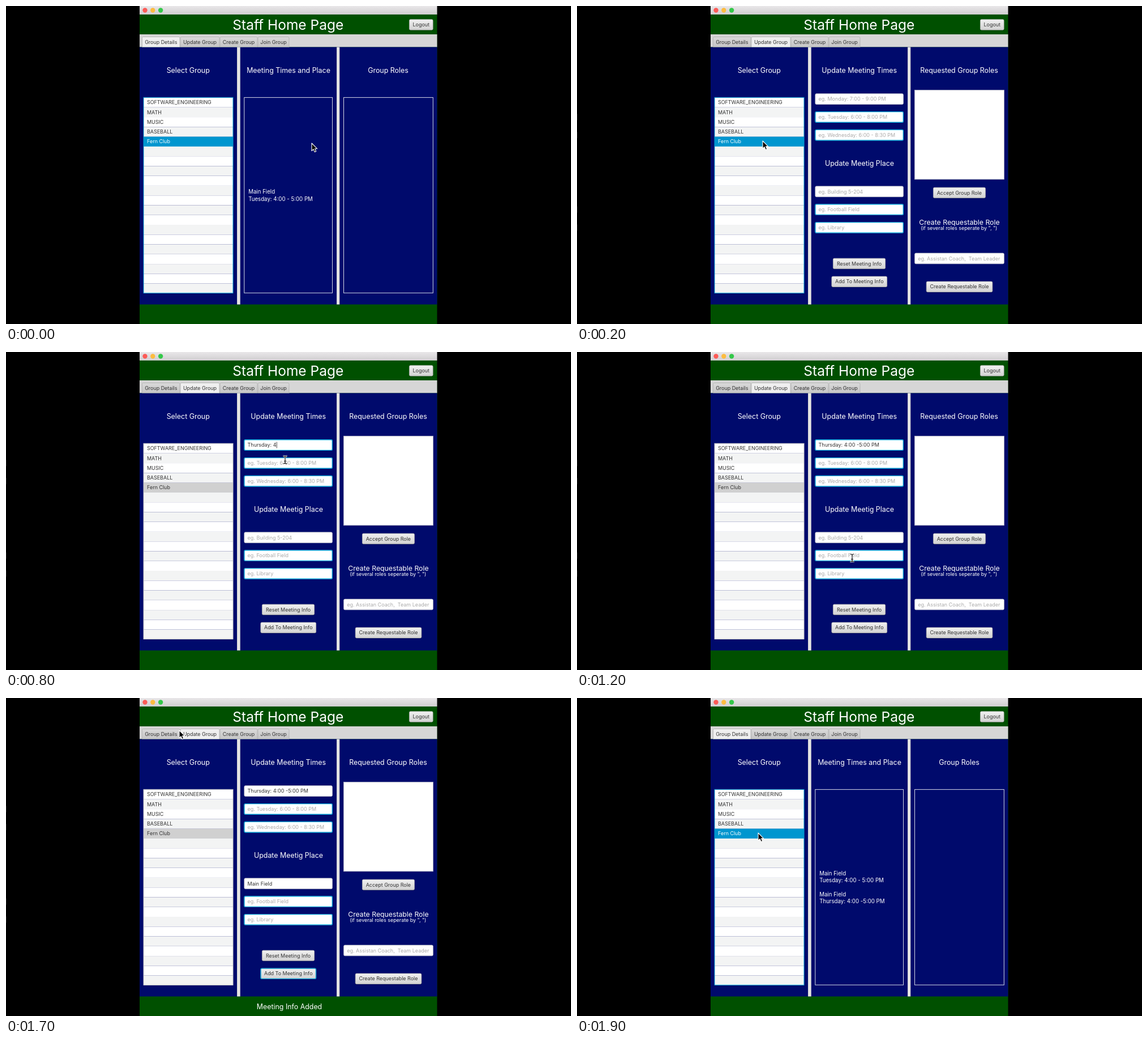
Write an HTML page that moves like this. It is 998 by 561 pixels and loops after 2000 ms.

```html
<!DOCTYPE html>
<html lang="en">
<head>
<meta charset="utf-8">
<title>Staff Home Page</title>
<style>
html, body { margin: 0; width: 100%; height: 100%; overflow: hidden; background: #000; }
svg { display: block; width: 998px; height: 561px; }
text { font-family: Inter, "Open Sans", sans-serif; font-optical-sizing: none; white-space: pre; }
</style>
</head>
<body>
<svg id="stage" viewBox="0 0 998 561">
  <defs>
    <linearGradient id="bar" x2="0" y2="1"><stop stop-color="#e9e7e9"/><stop offset="1" stop-color="#d0ced0"/></linearGradient>
    <linearGradient id="btn" x2="0" y2="1"><stop stop-color="#f1f1f1"/><stop offset="1" stop-color="#d2d2d2"/></linearGradient>
    <linearGradient id="tab" x2="0" y2="1"><stop stop-color="#d9d9d9"/><stop offset="1" stop-color="#c6c6c6"/></linearGradient>
    <linearGradient id="split"><stop stop-color="#d2d2d2"/><stop offset=".5" stop-color="#ececec"/><stop offset="1" stop-color="#d2d2d2"/></linearGradient>
  </defs>
</svg>
<script>
const NS = 'http://www.w3.org/2000/svg';
const stage = document.getElementById('stage');
const WHITE = '#fff', INK = '#333', HINT = '#ababab', FOCUS = '#039ed3', GREEN = '#005000', NAVY = '#000a6c';

function add(parent, tag, attrs, content) {
  const el = document.createElementNS(NS, tag);
  for (const key in attrs) el.setAttribute(key, attrs[key]);
  if (content !== undefined) el.textContent = content;
  parent.appendChild(el);
  return el;
}
const group = (parent = stage) => add(parent, 'g', {});
const show = (el, on) => el.setAttribute('visibility', on ? 'inherit' : 'hidden');
const rect = (p, x, y, width, height, fill, more) => add(p, 'rect', { x, y, width, height, fill, ...more });
const label = (p, x, y, size, fill, str, anchor = 'start') =>
  add(p, 'text', { x, y, 'font-size': size, fill, 'text-anchor': anchor }, str);
const heading = (p, x, y, str) => label(p, x, y, 12.4, WHITE, str, 'middle');
const ring = (p, x, y, w, h) => rect(p, x, y, w, h, 'none', { rx: 2, stroke: FOCUS, 'stroke-width': 1.4 });

function button(p, x, y, w, str) {
  rect(p, x, y + .8, w, 19, '#000', { rx: 2, opacity: .3 });
  rect(p, x + .4, y + .4, w - .8, 18.4, 'url(#btn)', { rx: 2, stroke: '#b4b4b4', 'stroke-width': .8 });
  label(p, x + w / 2, y + 12.7, 8.95, INK, str, 'middle');
}

function field(p, x, cy, w, hint) {
  rect(p, x + .4, cy - 9.4, w - .8, 18.8, WHITE, { rx: 2, stroke: '#c4c4cc', 'stroke-width': .8 });
  const focus = ring(p, x + .5, cy - 9.3, w - 1, 18.6);
  const text = label(p, x + 6, cy + 3.2, 9, HINT, hint);
  const caret = rect(p, 0, cy - 5.5, .8, 11, '#222');
  return (value, focused, blink) => {
    text.textContent = value || (focused ? '' : hint);
    text.setAttribute('fill', value ? INK : HINT);
    show(focus, focused);
    show(caret, focused && blink);
    const width = value ? text.getComputedTextLength() : 0;
    caret.setAttribute('x', x + 6.3 + width);
  };
}

// Window frame
rect(stage, 236, 0, 525.5, 15, 'url(#bar)');
['#fc5b57', '#fdbc40', '#34c84a'].forEach((fill, i) =>
  add(stage, 'circle', { cx: 245.5 + i * 13.8, cy: 7.5, r: 4.2, fill }));
rect(stage, 236, 15, 525.5, 546, GREEN);
label(stage, 498.3, 41.6, 24.5, WHITE, 'Staff Home Page', 'middle');
button(stage, 712, 23.4, 42.5, 'Logout');
rect(stage, 236, 50, 525.5, 22.5, '#d6d6d6');
rect(stage, 236, 72.5, 525.5, 454, NAVY);

const tabs = [['Group Details', 240.5, 66.5], ['Update Group', 308, 69], ['Create Group', 378, 66], ['Join Group', 445, 55]]
  .map(([name, x, w]) => {
    const d = `M${x} 72.5V56.5q0-2 2-2h${w - 4}q2 0 2 2v16`;
    const shape = add(stage, 'path', { d, stroke: '#b0b0b0', 'stroke-width': .8 });
    const focus = ring(stage, x + .7, 55, w - 1.4, 17);
    label(stage, x + w / 2, 67, 8.95, INK, name, 'middle');
    return { shape, focus };
  });

[[408, 5.8], [584, 5.3]].forEach(([x, w]) => rect(stage, x, 72.5, w, 454, 'url(#split)'));

// Group list
heading(stage, 321.7, 118.3, 'Select Group');
const ROW = 17.27, TOP = 161.5;
for (let i = 0; i < 20; i++)
  rect(stage, 243, TOP + i * ROW, 158, ROW, i % 2 ? '#f3f4f4' : WHITE);
const picked = rect(stage, 243, TOP + 4 * ROW, 158, ROW, FOCUS);
const rows = ['SOFTWARE_ENGINEERING', 'MATH', 'MUSIC', 'BASEBALL', 'Fern Club']
  .map((name, i) => label(stage, 249, 173.4 + i * ROW, 8.95, INK, name));
const listEdge = rect(stage, 243, 161.3, 158, 345, 'none', { 'stroke-width': 1 });

// Group Details pane
const details = group();
heading(details, 499, 118.3, 'Meeting Times and Place');
heading(details, 675, 118.3, 'Group Roles');
[[420.8, 155.7], [596.5, 157.8]].forEach(([x, w]) =>
  rect(details, x, 161.4, w, 344.8, 'none', { stroke: '#d8d9e6', 'stroke-width': 1 }));
function notes(lines, y) {
  const g = group(details);
  lines.forEach((line, i) => label(g, 428.2, y + i * 12.4, 9.68, WHITE, line));
  return g;
}
const tuesday = ['Main Field', 'Tuesday: 4:00 - 5:00 PM'];
const before = notes(tuesday, 331.2);
const after = notes([...tuesday, '', 'Main Field', 'Thursday: 4:00 -5:00 PM'], 312.6);

// Update Group pane
const update = group();
heading(update, 498.7, 118.3, 'Update Meeting Times');
heading(update, 499, 282.2, 'Update Meetig Place');
heading(update, 675, 118.3, 'Requested Group Roles');
const [setTime] = ['Monday: 7:00 - 9:00 PM', 'Tuesday: 6:00 - 8:00 PM', 'Wednesday: 6:00 - 8:30 PM']
  .map((hint, i) => field(update, 420.5, 164.1 + i * 31.8, 156.3, 'eg. ' + hint));
const [setPlace] = ['Building 5-204', 'Football Field', 'Library']
  .map((hint, i) => field(update, 420.5, 327.3 + i * 31.8, 156.3, 'eg. ' + hint));
field(update, 596.2, 445.4, 158.5, 'eg. Assistan Coach,  Team Leader')('', false);
rect(update, 596.5, 148.3, 157.8, 157.5, WHITE, { stroke: '#c4c4cc', 'stroke-width': .8 });
button(update, 629, 319.8, 92.8, 'Accept Group Role');
button(update, 452, 444.8, 93, 'Reset Meeting Info');
button(update, 449.5, 476.7, 98.5, 'Add To Meeting Info');
const addFocus = ring(update, 450, 477.1, 97.5, 18.3);
button(update, 616.8, 485.7, 117.4, 'Create Requestable Role');
label(update, 675.4, 385.7, 12.25, WHITE, 'Create Requestable Role', 'middle');
label(update, 674.8, 394.6, 8.92, WHITE, '(if several roles seperate by ", ")', 'middle');

const notice = heading(stage, 500.5, 548.7, 'Meeting Info Added');

// Pointers
const arrow = add(stage, 'path', {
  d: 'M0 0V13.6L3.1 10.7 5.2 15.6 7.7 14.5 5.6 9.8H9.7Z',
  fill: '#000', stroke: WHITE, 'stroke-width': 1.1, 'stroke-linejoin': 'round'
});
const beam = group();
[[WHITE, 2.6], ['#111', 1.2]].forEach(([stroke, width]) => add(beam, 'path', {
  d: 'M-3.5-6.5Q0-6.5 0-4.5Q0-6.5 3.5-6.5M0-4.5V5M-2 2.5H2M-3.5 7Q0 7 0 5Q0 7 3.5 7',
  fill: 'none', stroke, 'stroke-width': width
}));

// Each step holds 100 ms: pointer, x, y, focus, typed time, typed place
const STEP = 100;
const FULL = 'Thursday: 4:00 -5:00 PM';
const PLACE = 'Main Field';
const steps = [
  ['arrow', 540, 242, 'list', 0, 0],
  ['arrow', 460, 136, 'tab', 0, 0],
  ['arrow', 328, 238, 'list', 0, 0],
  ['beam', 500, 168, 'time', 0, 0],
  ['beam', 500, 169, 'time', 4, 0],
  ['beam', 500, 169, 'time', 7, 0],
  ['beam', 500, 169, 'time', 9, 0],
  ['beam', 497, 178, 'time', 10, 0],
  ['beam', 493, 190, 'time', 11, 0],
  ['beam', 493, 190, 'time', 14, 0],
  ['beam', 493, 190, 'time', 17, 0],
  ['beam', 493, 190, 'time', 21, 0],
  ['beam', 486, 363, 'time', 23, 0],
  ['beam', 484, 330, 'place', 23, 0],
  ['beam', 484, 330, 'place', 23, 4],
  ['beam', 484, 330, 'place', 23, 10],
  ['arrow', 498, 486, 'add', 23, 10],
  ['arrow', 306, 57, 'add', 23, 10],
  ['arrow', 280, 62, 'tab', 23, 10],
  ['arrow', 320, 238, 'list', 23, 10]
];

function draw(n) {
  const [pointer, x, y, focus, typed, placed] = steps[n];
  const onDetails = n < 1 || n > 17;
  const active = onDetails ? 0 : 1;
  tabs.forEach(({ shape, focus: edge }, i) => {
    shape.setAttribute('fill', i === active ? '#efefef' : 'url(#tab)');
    show(edge, i === active && focus === 'tab');
  });
  const onList = focus === 'list';
  show(picked, n !== 1);
  picked.setAttribute('fill', onList ? '#0096cf' : '#d0d0d0');
  rows[4].setAttribute('fill', onList ? WHITE : INK);
  listEdge.setAttribute('stroke', onList ? FOCUS : '#c8c8c8');

  show(details, onDetails);
  show(update, !onDetails);
  show(before, n < 19);
  show(after, n === 19);
  setTime(FULL.slice(0, typed), focus === 'time', typed < FULL.length);
  setPlace(PLACE.slice(0, placed), focus === 'place', true);
  show(addFocus, focus === 'add');
  show(notice, n > 15 && n < 19);

  show(arrow, pointer === 'arrow');
  show(beam, pointer === 'beam');
  (pointer === 'arrow' ? arrow : beam).setAttribute('transform', `translate(${x} ${y})`);
}

let start = performance.now();
function tick(now) {
  const elapsed = Math.max(0, now - start);
  draw(Math.floor(elapsed / STEP) % steps.length);
  requestAnimationFrame(tick);
}
draw(0);
requestAnimationFrame(tick);
</script>
</body>
</html>
```
